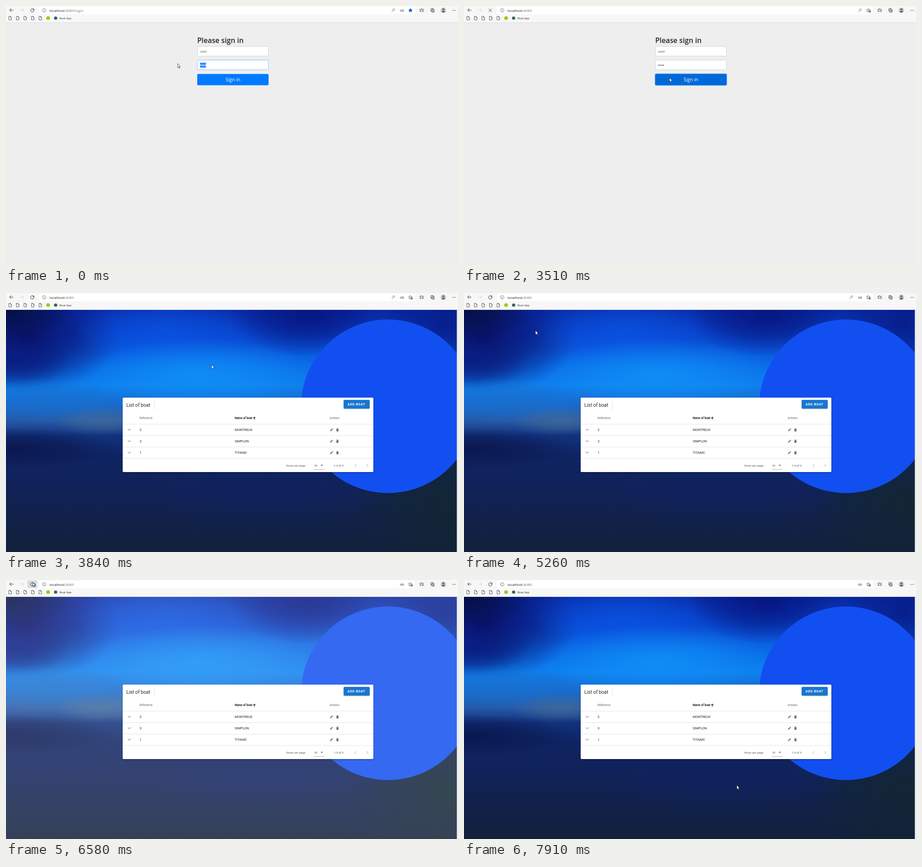
Write an HTML page with a canvas that moves like this. It is 988 px wide and 567 px high and loops after 8000 ms.

```html
<!DOCTYPE html>
<html lang="en">
<head>
<meta charset="utf-8">
<title>Boat App</title>
<style>
html, body { margin: 0; width: 100%; height: 100%; overflow: hidden; background: #fff; }
canvas { display: block; width: 988px; height: 567px; }
</style>
</head>
<body>
<canvas id="stage" width="988" height="567"></canvas>
<script>
const W = 988, H = 567, LOOP = 8000, TOP = 37;
const ctx = document.getElementById('stage').getContext('2d');
const UI = '"Open Sans", "Noto Sans", sans-serif';
const APP = 'Roboto, Arial, sans-serif';

// Pointer moves: start, end, number of steps, way points
const moves = [
  [1540, 2110, 6, [375, 126], [449, 157]],
  [4270, 5050, 8, [449, 157], [604, 166], [419, 98]],
  [5160, 5260, 2, [419, 98], [156, 82]],
  [5480, 5820, 4, [156, 82], [58, 5]],
  [7350, 7910, 6, [58, 5], [596, 449]]
];

function pointerAt(t) {
  let pos = moves[0][3];
  for (const [start, end, steps, ...pts] of moves) {
    if (t < start) break;
    const gap = (end - start) / (steps - 1);
    const p = Math.min(1, (Math.floor((t - start) / gap + 0.01) + 1) / steps);
    const u = p * p * (3 - 2 * p) * (pts.length - 1);
    const i = Math.min(pts.length - 2, Math.floor(u)), f = u - i;
    pos = [0, 1].map(k => pts[i][k] + (pts[i + 1][k] - pts[i][k]) * f);
  }
  return pos;
}

function rect(x, y, w, h, color) {
  ctx.fillStyle = color;
  ctx.fillRect(x, y, w, h);
}

function box(x, y, w, h, r, fill, stroke) {
  ctx.beginPath();
  ctx.roundRect(x, y, w, h, r);
  if (fill) { ctx.fillStyle = fill; ctx.fill(); }
  if (stroke) { ctx.strokeStyle = stroke; ctx.lineWidth = 1; ctx.stroke(); }
}

function circle(x, y, r, fill, stroke, width = 1) {
  ctx.beginPath();
  ctx.arc(x, y, r, 0, Math.PI * 2);
  if (fill) { ctx.fillStyle = fill; ctx.fill(); }
  if (stroke) { ctx.strokeStyle = stroke; ctx.lineWidth = width; ctx.stroke(); }
}

function path(x, y, d, stroke, width = 1, fill) {
  const p = new Path2D(d);
  ctx.save();
  ctx.translate(x, y);
  if (fill) { ctx.fillStyle = fill; ctx.fill(p); }
  if (stroke) { ctx.strokeStyle = stroke; ctx.lineWidth = width; ctx.stroke(p); }
  ctx.restore();
}

function text(str, x, y, size, color, family = APP, weight = 400, spacing = 0) {
  ctx.font = `${weight} ${size}px ${family}`;
  ctx.letterSpacing = spacing + 'px';
  ctx.fillStyle = color;
  ctx.fillText(str, x, y);
  const width = ctx.measureText(str).width;
  ctx.letterSpacing = '0px';
  return x + width;
}

function shadowed(blur, dy, alpha, draw) {
  ctx.save();
  ctx.shadowColor = `rgba(0,0,0,${alpha})`;
  ctx.shadowBlur = blur;
  ctx.shadowOffsetY = dy;
  draw();
  ctx.restore();
}

function star(x, y, r, fill, stroke) {
  ctx.beginPath();
  for (let i = 0; i < 10; i++) {
    const a = i * Math.PI / 5 - Math.PI / 2, d = i % 2 ? r * 0.48 : r;
    ctx.lineTo(x + d * Math.cos(a), y + d * Math.sin(a));
  }
  ctx.closePath();
  if (fill) { ctx.fillStyle = fill; ctx.fill(); }
  ctx.strokeStyle = stroke;
  ctx.lineWidth = 0.9;
  ctx.stroke();
}

function key(x) {
  circle(x + 1.5, 8, 2, null, '#777', 0.9);
  path(x, 9.5, 'M0 0L-3 3M-2 2L-1 3', '#777', 0.9);
}

function translateIcon() {
  text('a', 861, 12, 7, '#444', UI);
  text('あ', 864.5, 12, 5.8, '#444', '"Noto Sans CJK JP", sans-serif');
}

function reloadIcon() {
  ctx.beginPath();
  ctx.arc(57.5, 9.5, 3.8, -0.5, Math.PI * 1.72);
  ctx.strokeStyle = '#333';
  ctx.lineWidth = 1;
  ctx.stroke();
  path(61, 5.5, 'M0 0V2.8H-2.8', '#333');
}

function chrome(t) {
  const loading = (t >= 2530 && t < 3740) || (t >= 6250 && t < 6460);
  const login = t < 3510;
  rect(0, 0, W, 36, '#f7f7f7');
  rect(0, 36, W, 1, '#dcdcdc');
  box(72, 1, 822, 17, 3, '#fff');
  if (t >= 6130 && t < 7350) box(47, 1, 21, 16.5, 2, '#dadada');

  path(12, 9, 'M4.2 0H-4M-0.5 -3.7L-4.2 0L-0.5 3.7', '#333');
  path(35, 9, 'M-4.2 0H4M0.5 -3.7L4.2 0L0.5 3.7', '#d4d4d4');
  if (loading) path(57.5, 9.5, 'M-3.3 -3.3L3.3 3.3M3.3 -3.3L-3.3 3.3', '#333');
  else reloadIcon();

  circle(83.5, 9.5, 3.9, null, '#666', 0.8);
  path(83.5, 9.5, 'M0 -0.6V2.2M0 -2.1V-1.2', '#666', 0.9);
  const end = text('localhost', 95, 12.5, 7.9, '#222', UI);
  text(login ? ':8089/login' : ':8089', end, 12.5, 7.9, '#777', UI);

  if (t < 3510 || (t >= 3740 && t < 6250)) key(846);
  if (t >= 3510 && t < 3740) key(865);
  else translateIcon();
  if (login) star(884, 9.6, 4.3, '#0a5fd0', '#0a5fd0');
  else {
    star(883.6, 9.4, 4.1, null, '#555');
    circle(886.6, 11.7, 2.5, '#555');
    path(886.6, 11.7, 'M-1.5 0H1.5M0 -1.5V1.5', '#fff', 0.7);
  }
  star(907.6, 9.2, 3.9, null, '#333');
  rect(909.3, 7, 5, 6, '#f7f7f7');
  path(909.3, 7.2, 'M0 0H4M0.5 2.4H4M0.5 4.8H4', '#333', 0.9);
  box(928.5, 5.5, 5.5, 6, 1, null, '#444');
  box(930.5, 7.5, 5.5, 6, 1, '#f7f7f7', '#333');
  path(933.2, 10.5, 'M-1.7 0H1.7M0 -1.7V1.7', '#333', 0.8);
  circle(956, 9.3, 6, '#c9c9c9');
  circle(956, 7.3, 2.2, '#666');
  path(956, 13, 'M-3.6 0Q-3.4 -2.8 0 -2.8T3.6 0Q0 2.4 -3.6 0Z', null, 1, '#666');
  for (let i = -1; i < 2; i++) circle(979.5 + i * 3, 9.5, 0.8, '#333');

  for (let i = 0; i < 5; i++)
    path(9 + i * 16.5, 26.5, 'M-2.9 -3.8H0.6L2.9 -1.5V3.8H-2.9ZM0.6 -3.8V-1.5H2.9', '#444', 0.9, '#fff');
  circle(92, 26.5, 4, '#93cf10');
  circle(108.5, 26.5, 3.6, '#38635f');
  text('Boat App', 117, 28.7, 6.1, '#222', UI);
}

function field(y, focus) {
  box(418.5, y + 0.5, 155, 21, 2, '#fff', focus ? '#8fc4fb' : '#d0d5da');
}

function loginPage(t, pos) {
  const pressed = t >= 2440;
  rect(0, TOP, W, H - TOP, '#eeeeee');
  text('Please sign in', 418, 81, 15.6, '#212529', UI, 600);
  field(88, false);
  text('user', 424, 102.3, 7.5, '#495057', UI);
  field(118, !pressed);

  const selected = t < 150;
  const count = selected ? 4 : 1 + [340, 560, 780].filter(s => t >= s).length;
  if (selected) rect(424, 124, 13.3, 11, '#3390ff');
  for (let i = 0; i < count; i++)
    circle(425.7 + i * 3.4, 129.6, 1.2, selected ? '#fff' : '#495057');
  const caret = !selected && !pressed && (t < 1320 || t >= 1880);
  if (caret) rect(423.5 + count * 3.4, 124, 0.8, 11, '#333');

  const hover = overButton(pos);
  if (pressed) box(416.8, 147.5, 158.4, 27, 4, '#80bcff');
  box(418, 148.7, 156, 24.8, 2.5, hover ? '#0069d9' : '#007bff');
  text('Sign in', 480, 165.2, 10.4, '#fff', UI);
}

function overButton([x, y]) {
  return x >= 418 && x < 574 && y >= 149 && y < 174;
}

function chevron(x, y, dir, color) {
  path(x, y, `M${-1.5 * dir} -2.8L${1.5 * dir} 0L${-1.5 * dir} 2.8`, color, 0.9);
}

function card(x, y, w, h) {
  shadowed(3, 1.2, 0.4, () => box(x, y, w, h, 2, '#fff'));
}

function blueButton(x, y, w, h) {
  shadowed(2, 1, 0.35, () => box(x, y, w, h, 2, '#1976d2'));
}

function sortArrow(x, y) {
  path(x, y, 'M0 3.2V-2.8M-2.7 0L0 -2.8L2.7 0', '#222', 1.1);
}

function pager(line, tri, prev, next, y) {
  rect(line, y + 8.3, 23, 0.8, '#999');
  path(tri, y, 'M-2.7 -1.2H2.7L0 1.5Z', null, 1, '#666');
  chevron(prev, y, -1, '#999');
  chevron(next, y, 1, '#999');
}

function emptyPage() {
  rect(0, TOP, W, H - TOP, '#fff');
  card(255, 253, 536, 115);
  rect(322, 261, 0.8, 19, '#ddd');
  blueButton(723, 259, 59.5, 19);
  sortArrow(531.5, 300);
  rect(255, 311.8, 536, 2.2, '#bad6f1');
  rect(255, 311.8, 19, 2.2, '#1976d2');
  rect(255, 337, 536, 0.8, '#e0e0e0');
  pager(679, 696, 751.5, 777, 352.5);
}

// Soft sky and sea backdrop
function makeBackdrop() {
  const c = document.createElement('canvas');
  c.width = W;
  c.height = H;
  const g = c.getContext('2d');
  const sky = g.createLinearGradient(0, TOP, 0, H);
  [[0, '9,42,165'], [0.1, '9,68,205'], [0.22, '10,105,230'], [0.31, '14,128,238'],
    [0.37, '22,112,215'], [0.46, '38,88,165'], [0.52, '18,50,125'], [0.6, '14,36,98'],
    [0.72, '17,34,90'], [1, '18,32,58']].forEach(([p, rgb]) => sky.addColorStop(p, `rgb(${rgb})`));
  g.fillStyle = sky;
  g.fillRect(0, 0, W, H);

  const blob = (x, y, rx, ry, rgb, a) => {
    g.save();
    g.translate(x, y);
    g.scale(rx, ry);
    const r = g.createRadialGradient(0, 0, 0, 0, 0, 1);
    r.addColorStop(0, `rgba(${rgb},${a})`);
    r.addColorStop(0.5, `rgba(${rgb},${a * 0.6})`);
    r.addColorStop(1, `rgba(${rgb},0)`);
    g.fillStyle = r;
    g.fillRect(-1, -1, 2, 2);
    g.restore();
  };
  blob(40, 100, 210, 120, '9,16,105', 1);
  blob(0, 37, 150, 70, '5,14,62', 0.9);
  blob(20, 150, 120, 60, '10,25,125', 0.8);
  blob(350, 80, 200, 90, '10,88,235', 0.6);
  blob(420, 175, 260, 75, '16,150,250', 0.7);
  blob(660, 50, 170, 90, '6,20,125', 0.9);
  blob(960, 70, 160, 130, '7,28,135', 0.9);
  blob(90, 235, 170, 50, '24,112,205', 0.7);
  blob(210, 280, 110, 32, '75,112,150', 0.6);
  blob(20, 340, 220, 45, '10,22,78', 0.9);
  blob(900, 308, 110, 55, '40,140,255', 0.9);
  blob(960, 460, 210, 170, '18,38,52', 1);
  blob(560, 440, 260, 70, '14,34,100', 0.5);

  g.fillStyle = '#124ff0';
  g.beginPath();
  g.arc(835, 248, 190, 0, Math.PI * 2);
  g.fill();
  return c;
}
const backdrop = makeBackdrop();

function pencil(x, y) {
  path(x, y, 'M-3 3V1.5L1 -2.5L2.5 -1L-1.5 3ZM1.5 -3L2.2 -3.5L3.5 -2.2L3 -1.5Z', null, 1, '#666');
}

function trash(x, y) {
  path(x, y, 'M-2.1 -1.8H2.1V3.4H-2.1ZM-2.7 -3H-1L-0.6 -3.5H0.6L1 -3H2.7V-2.3H-2.7Z', null, 1, '#666');
}

function boatPage(t, [px, py]) {
  const alpha = t >= 6460 && t < 6680 ? (t < 6580 ? 0.44 : 0.85) : 1;
  rect(0, TOP, W, H - TOP, '#fff');
  ctx.globalAlpha = alpha;
  ctx.drawImage(backdrop, 0, TOP, 985.5, H - TOP, 0, TOP, 985.5, H - TOP);
  ctx.globalAlpha = 1;

  card(255, 229, 548, 163);
  text('List of boat', 263, 249.3, 10.4, '#222');
  rect(324, 236, 0.8, 20, '#ddd');
  blueButton(738, 234, 57, 19);
  text('ADD BOAT', 746.6, 246.2, 7.1, '#fff', APP, 700, 0.64);

  text('Reference', 292, 276.3, 6.3, '#666');
  text('Name of boat', 500, 276.3, 6.3, '#222', APP, 700);
  sortArrow(542.7, 274.3);
  text('Actions', 707.5, 276.3, 6.3, '#666');
  rect(255, 286.7, 548, 0.8, '#ddd');

  [['2', 'MONTREUX'], ['3', 'SIMPLON'], ['1', 'TITANIC']].forEach(([ref, name], i) => {
    const y = 299.3 + i * 25;
    if (px > 255 && px < 803 && Math.abs(py - y) < 12.5) rect(255, y - 12, 548, 24.5, '#eee');
    path(269.5, y, 'M-3 -1.5L0 1.5L3 -1.5', '#444');
    text(ref, 292, y + 2.6, 7.3, '#222');
    text(name, 500, y + 2.6, 7.25, '#222');
    pencil(711.5, y + 0.3);
    trash(724.5, y + 0.3);
    rect(255, y + 12.5, 548, 0.8, '#ddd');
  });

  text('Rows per page:', 613, 379.8, 6.25, '#555');
  text('10', 673.3, 379.8, 6.25, '#333');
  text('1-3 of 3', 716.7, 379.8, 6.25, '#444');
  pager(673, 690.3, 764, 789.7, 377.5);
}

function pointer(t, [x, y]) {
  if (overButton([x, y]) && t < 3190) {
    path(x, y, 'M0 0.6Q1 -1 1.8 0.6V4L5 4.6Q6.4 5 6.2 6.6L5.3 10.5H0.6L-2 7Q-2 5.6 0 6.6Z', '#222', 0.7, '#fff');
    return;
  }
  if (t >= 6580 && t < 6790) circle(x + 3.5, y + 6, 2.6, null, '#1580d8', 1.8);
  path(x, y, 'M0.3 0V9L2.3 7.2L3.7 10.4L5.1 9.8L3.7 6.7H6.2Z', '#222', 0.75, '#fff');
}

function draw(now) {
  const t = now % LOOP;
  const pos = pointerAt(t);
  if (t < 3740) loginPage(t, pos);
  else {
    if (t < 3840) emptyPage();
    else boatPage(t, pos);
    rect(985.5, TOP, 2.5, H - TOP, '#f0f0f0');
  }
  chrome(t);
  pointer(t, pos);
}

const begin = performance.now();
function tick() {
  draw(performance.now() - begin);
  requestAnimationFrame(tick);
}
tick();
</script>
</body>
</html>
```
